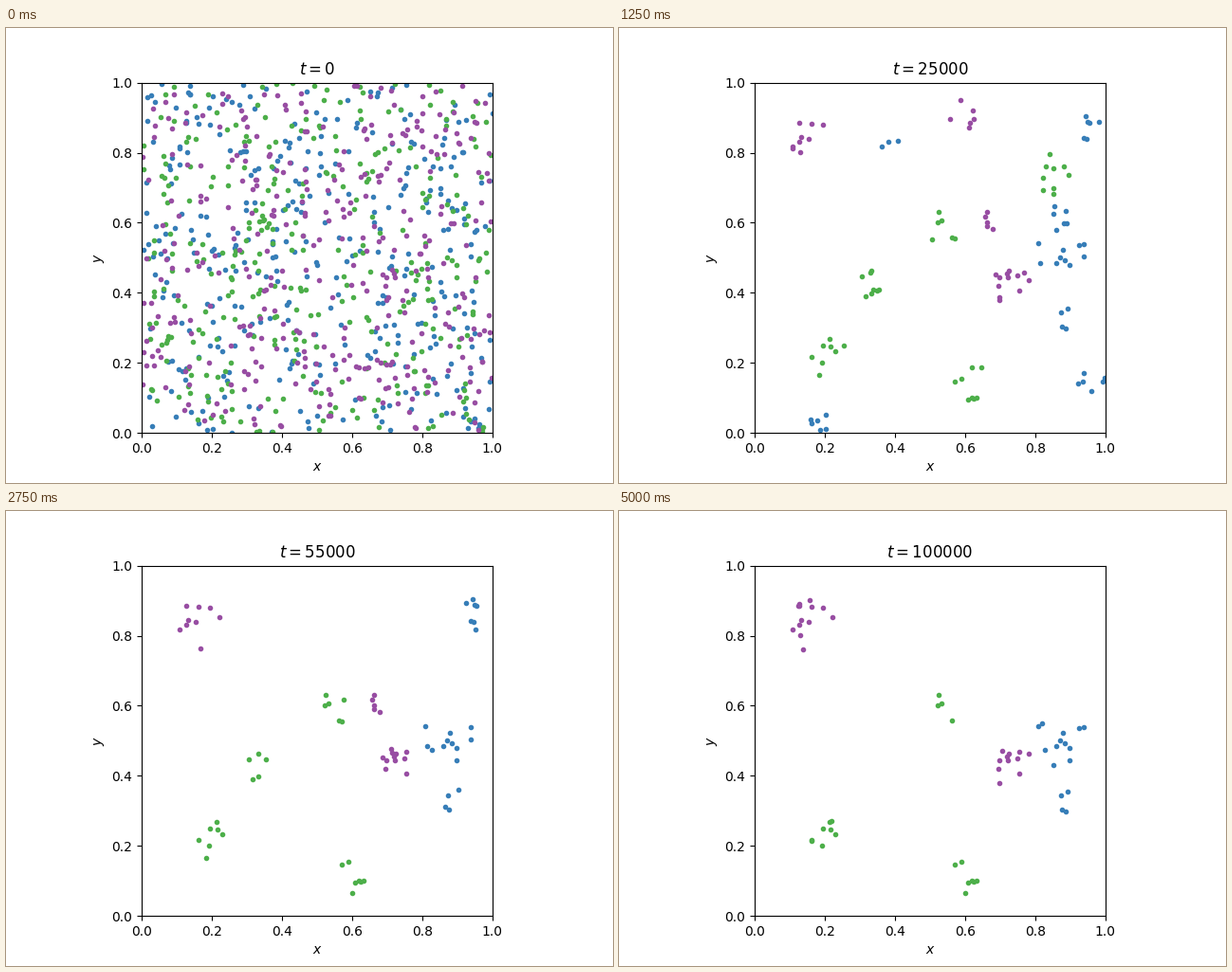
A matplotlib script that plays this animation: 640x480 px, repeating every 5.25 s.

```python
import numpy as np
import matplotlib.pyplot as plt
from matplotlib.animation import FuncAnimation

FRAMES, INTERVAL, STEP = 21, 250, 5000
N_SITES = 1000
COLORS = ["#377eb8", "#4daf4a", "#984ea3"]
BLUE, GREEN, PURPLE = range(3)

# Lasting colonies: species, centre, typical size, last step
COLONIES = [
    (PURPLE, (.16, .84), 11, 20),
    (PURPLE, (.73, .43), 14, 20),
    (GREEN, (.54, .59), 6, 20),
    (GREEN, (.20, .22), 7, 20),
    (GREEN, (.61, .12), 9, 20),
    (GREEN, (.32, .43), 7, 14),
    (GREEN, (.86, .73), 9, 6),
    (BLUE, (.88, .50), 10, 20),
    (BLUE, (.88, .33), 5, 20),
    (BLUE, (.95, .87), 6, 17),
    (BLUE, (.96, .15), 8, 5),
]

rng = np.random.default_rng(7)
sites = rng.random((N_SITES, 2))
start = rng.integers(0, 3, N_SITES)
strays = [(rng.integers(3), rng.random(2), rng.integers(2, 7))
          for _ in range(126)]


def settle(state, species, centre, n, rng):
    """Occupy n sites, loosely the nearest ones to the centre."""
    dist = np.hypot(*(sites - centre).T)
    score = dist + .012 * np.sqrt(n) * rng.random(N_SITES)
    state[np.argsort(score)[:n]] = species


def state_at(step):
    if step == 0:
        return start
    rng = np.random.default_rng(100 + step)
    state = np.full(N_SITES, -1)
    # Small groups die out with the square of time
    for species, centre, n in strays[:int(len(strays) / step**2)]:
        settle(state, species, centre, n, rng)
    for species, centre, size, last in COLONIES:
        if step <= last:
            n = round(size * rng.uniform(.7, 1.3))
            settle(state, species, centre, n, rng)
    return state


fig, ax = plt.subplots(figsize=(6.4, 4.8), dpi=100)
ax.set(xlim=(0, 1), ylim=(0, 1), aspect="equal", xlabel="$x$", ylabel="$y$")
title = ax.set_title("$t = 0$")
dots = [ax.plot([], [], ".", color=c)[0] for c in COLORS]


def draw(step):
    state = state_at(step)
    for species, line in enumerate(dots):
        line.set_data(*sites[state == species].T)
    title.set_text(f"$t = {step * STEP}$")
    return [*dots, title]


anim = FuncAnimation(fig, draw, frames=FRAMES, interval=INTERVAL,
                     repeat=True, repeat_delay=0)
plt.show()
```
